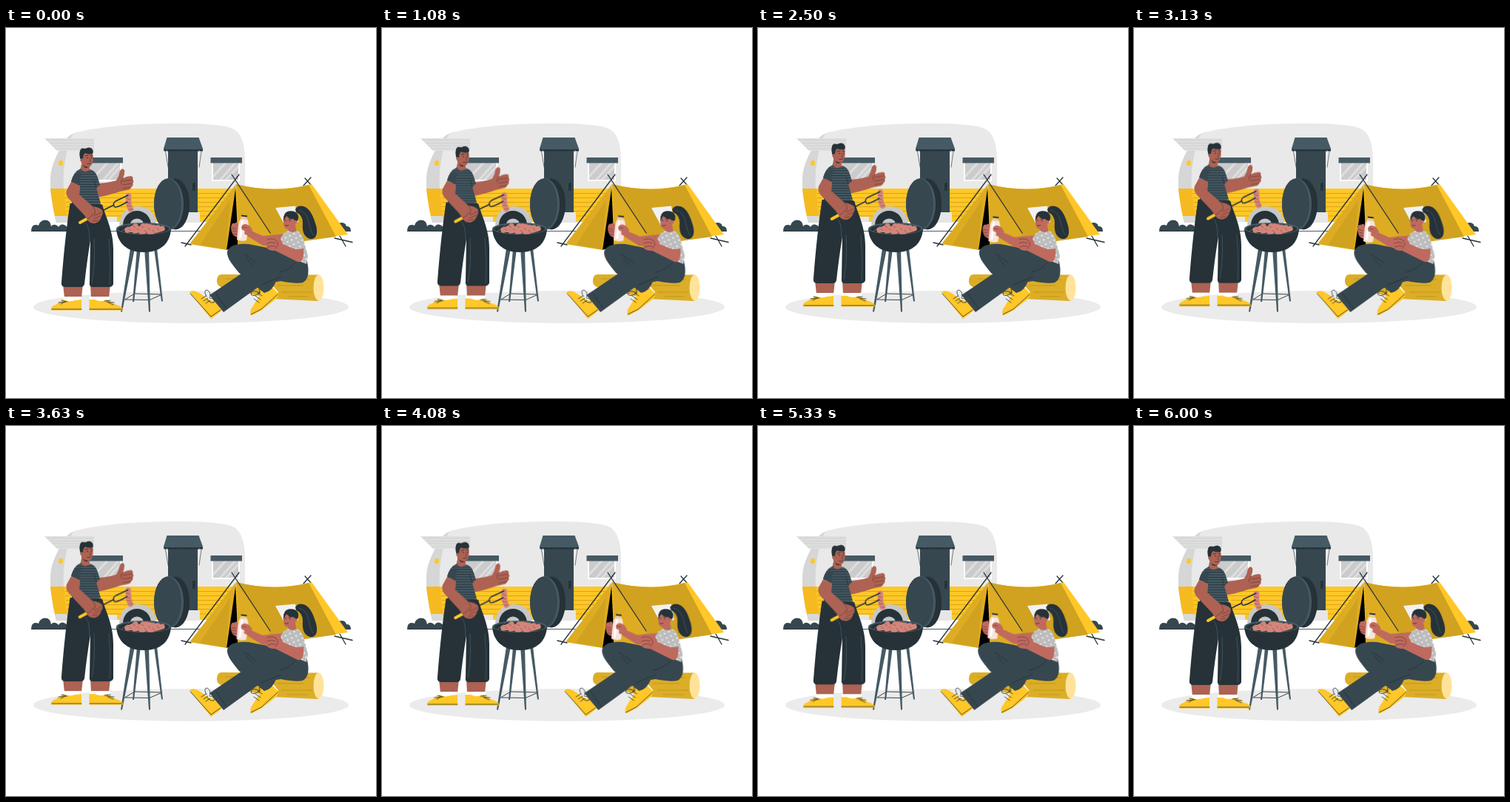
Write an HTML page that moves like this. It is 500x500 px and loops after 6040 ms.

```html
<!DOCTYPE html>
<html lang="en">
<head>
<meta charset="utf-8">
<title>Camping</title>
<style>
html, body { margin: 0; width: 100%; height: 100%; overflow: hidden; background: #fff; }
svg { display: block; width: 100vw; height: 100vh; }
.navy { fill: #263238; }
.slate { fill: #37474f; }
.steel { fill: #455a64; }
.sun { fill: #ffc727; }
.gold { fill: #d1a220; }
.flap { fill: #ddac22; }
.skin { fill: #ad6253; }
#woman .skin { fill: #bf6a5e; }
.ink { fill: none; stroke: #263238; stroke-width: .8; stroke-linecap: round; stroke-linejoin: round; }
.pole { fill: none; stroke: #263238; stroke-width: 1.3; stroke-linecap: round; }
.fold { fill: none; stroke: #6d3a33; stroke-width: .7; stroke-linecap: round; }
.link { fill: none; stroke: #d3857a; stroke-width: 7.5; stroke-linecap: round; }
.char { fill: none; stroke: #9d5348; stroke-width: .8; }
</style>
</head>
<body>
<svg viewBox="0 0 500 500">
  <defs>
    <pattern id="stripes" width="8" height="3.4" patternUnits="userSpaceOnUse">
      <rect width="8" height="3.4" fill="#455a64"/><rect width="8" height="1" fill="#263238"/>
    </pattern>
    <pattern id="dots" width="9" height="9" patternUnits="userSpaceOnUse" patternTransform="rotate(20)">
      <rect width="9" height="9" fill="#bdbdbd"/><circle cx="2" cy="2" r="1.1" fill="#fff"/><circle cx="6.500" cy="6.500" r="1.1" fill="#fff"/>
    </pattern>
    <clipPath id="glassL"><path d="M113 182h41v23h-41z"/></clipPath>
    <clipPath id="glassR"><path d="M280 182h34v23h-34z"/></clipPath>
  </defs>
  <rect width="500" height="500" fill="#fff"/>
  <ellipse cx="250" cy="377" rx="213" ry="22" fill="#ebebeb"/>

  <g id="bushes">
    <path class="slate" d="M34 275Q34 266 40 266Q43 266 44 267Q46 259.500 53 259.500Q60 259.500 61 268Q63 265 67 266Q70 267 71 269Q73 265 77 265.500Q84 267 85 275z"/>
    <path class="slate" d="M446 275Q446 263 453 263Q459 263 460 268Q466 267 466 275z"/>
    <path class="ink" d="M35 274.500H465"/>
  </g>

  <g id="caravan">
    <path fill="#d6d6d6" d="M98 141Q84 142 77 157Q60 184 60 204V220L68 262H110V141z"/>
    <path fill="#e9e9e9" d="M92 142C130 132 184 129 230 129C264 129 289 130 304 135C320 141 323 160 323 184V262H84C78 240 76 205 79 185C82 166 85 150 92 142z"/>
    <path fill="#f5ba20" d="M60 217H323V262H68Q63 246 60 217z"/>
    <path class="sun" d="M79 217H323V262H84Q79 240 79 217z"/>
    <path d="M80 223.500H316M80 229.500H316M81 235.500H316M81 241.500H316M82 247.500H316M83 254H316" stroke="#cf9d16" stroke-width=".8"/>
    <path fill="#d9d9d9" d="M66 254H82L84 263H68z"/>
    <path fill="#e6e6e6" d="M84 255H150V262H84zM219 249H262V263H219z"/>
    <ellipse class="sun" cx="74" cy="182.500" rx="3" ry="3.800"/>
    <path fill="#dedede" d="M52 149H119V166H69z"/>
    <path d="M55 151.500H119M59 155.500H119M62 159H119M66 163H119" stroke="#cacaca" stroke-width=".7"/>

    <path fill="#fff" d="M111 182H156V207H111z"/>
    <path fill="#cbcbcb" d="M113 182H154V205H113z"/>
    <path clip-path="url(#glassL)" d="M115 206L139 180M129 208L154 180M136 208L161 180" stroke="#dedede" stroke-width="3"/>
    <path class="steel" d="M102 175H158V182.500H102z"/>
    <path fill="#fff" d="M278 182H316V207H278z"/>
    <path fill="#cbcbcb" d="M280 182H314V205H280z"/>
    <path clip-path="url(#glassR)" d="M275 206L299 180M287 208L312 180M295 208L320 180" stroke="#dedede" stroke-width="3"/>
    <path class="steel" d="M276.500 175H319V182.500H276.500z"/>

    <path class="slate" d="M219 165H259V249H219z"/>
    <rect class="navy" x="252" y="209" width="4" height="11" rx="1.500"/>
    <path class="ink" d="M215.500 167L219 188M264 167L261 188" style="stroke-width:.6"/>
    <path class="steel" d="M217.500 148H260.500L266 163V165H213V163z"/>
    <path d="M213.500 165.300H266" fill="none" stroke="#263238" stroke-width="2.600" stroke-dasharray="4 .4"/>

    <path fill="#c7c7c7" d="M153 266Q155 241 178 241Q201 241 203 266z"/>
    <circle class="navy" cx="177" cy="266" r="19"/>
    <circle cx="177" cy="267" r="9.500" fill="#c7c7c7"/>
  </g>

  <g id="tent">
    <path class="pole" d="M402 213L412 202M404 203L412 212M237 290L250 293M444 284L468 289.500M451 281L459 295"/>
    <path class="sun" d="M311 211Q362 224 413 211L462 279L353 295z"/>
    <path class="gold" d="M311 211Q362 224 409 212L446 282L353 295z"/>
    <path fill="#f1f1f1" d="M364 243L391 240.500L395 262L377 267z"/>
    <path fill="#000" d="M310 213L297 300L314 296z"/>
    <path class="flap" d="M311 211L248 292L298 300z"/>
    <path class="gold" d="M303 232L262 293L297 299z"/>
    <path class="flap" d="M311 211Q313 240 313 296L354 300L357 276z"/>
    <path class="pole" d="M242 295L315 198M305 198L357 277"/>
  </g>

  <g id="log">
    <path fill="#dcae27" d="M291 333L422 333.500V369L360 366L290 350Q284 347 285 340Q286 333 291 333z"/>
    <path d="M360 340H410M366 348H402M372 357H414M380 363H408M296 339H310" stroke="#b58b18" stroke-width=".7"/>
    <ellipse cx="422.500" cy="351" rx="7" ry="17.500" fill="#ffe39b"/>
  </g>

  <g id="woman">
    <path class="navy" d="M391 245Q394 239 402 241C412 244 416 257 419 267C422 278 419 286 411 285C402 283 400 273 401 264Q401 252 392 249z"/>
    <path class="ink" d="M396 246Q406 248 409 262T415 280" style="stroke:#455a64"/>

    <path fill="#fff" d="M345 351L355 342L368 357L360 362z"/>
    <path class="sun" d="M346 352Q350 354 356 346L368 359Q368 363 365 366L346 381L332 388.500Q329 386 331 380L343 361z"/>
    <path class="ink" d="M331 387L345 380L367 360M335 366l7 5M337 362l7 5M340 358l6 4M343 358q-12-6-12 2q4 4 12-2q-2-8 2-4"/>
    <path class="slate" d="M388 304L328 292Q303 290 299 302C298 311 306 320 315 331L349 358Q360 356 365 342L348 324z"/>
    <path class="ink" d="M322 306Q332 312 347 324M325 311L341 329"/>

    <path fill="#fff" d="M273 364L281 358L297 379L288 386z"/>
    <path class="sun" d="M248 357Q253 353 261 358L273 366Q279 370 281 367L292 382L277 393z"/>
    <path class="ink" d="M249 359L277 390L290 381M264 366l6-4M267 369l6-4M270 372l6-4M271 363q-5-9 1-9q6 4 3 11q9 2 6 6q-6 1-9-4"/>
    <path class="slate" d="M386 300Q402 306 407 316C410 329 409 340 401 344Q392 346 371 342L345 347L294 384L275 361L352 309Q368 299 386 300z"/>
    <path class="ink" d="M283 358L298 379M369 330Q385 326 391 317M372 336Q360 341 345 347"/>

    <g id="reach">
      <path class="skin" d="M379 278L347 281L329 273L326 281L347 294L372 294z"/>
      <path class="skin" d="M304 269Q305 263 309 264Q314 260 314 268L318 277L313 283Q304 281 304 269z"/>
      <path fill="#f8e3dd" d="M317 258Q314 262 314 267L312 286Q317 289 325 287L328 267Q328 262 326 258z"/>
      <path fill="#fff" d="M318 260h3l-3 24h-3z"/>
      <path fill="#e8c987" d="M318 253L326 254L326 259L317 258z"/>
      <path class="navy" d="M318 252.500L326 253.500V255.500L318 254.500z"/>
      <path class="skin" d="M318 270Q318 265 324 265Q330 266 333 273L331 280Q325 281 322 278Q324 273 319 273z"/>
      <path class="fold" d="M305 270l6 2M305 274l6 1M307 278l5 1M320 269l5 1"/>
    </g>

    <path class="skin" d="M381 268L390 261L393 278Q387 281 381 276z"/>
    <path fill="url(#dots)" d="M376 277L382 274Q387 278 393 274Q400 277 402 285L408 308L406 319Q392 315 383 302Q372 290 371 284z"/>
    <path class="skin" d="M387 294L402 296Q403 309 400 314Q398 318 392 315L364 301Q353 301 352 296Q350 291 352 285Q354 280 360 282L367 285L370 290L388 298z"/>
    <path class="fold" d="M353 286Q360 283 365 287M353 291Q359 288 364 291M354 296Q360 293 364 295M365 287Q371 292 364 298"/>
    <path fill="url(#dots)" d="M393 276Q401 278 402 287L404 297Q395 301 386 297z"/>

    <path class="skin" d="M376 254Q374 264 376 269Q379 273 384 271Q391 269 392 261L389 252z"/>
    <path class="navy" d="M375 262Q374 249 382 247.500Q393 246 395 254Q396 260 391 264L389 258Q383 259 379 254Q376 258 375 262z"/>
    <circle class="skin" cx="391" cy="262" r="2.200"/>
    <circle class="navy" cx="378" cy="260" r=".8"/><circle class="navy" cx="383.500" cy="260.500" r=".8"/>
    <path class="ink" d="M377.500 266.500q2 2 4 0M382 258l3 .5"/>
  </g>

  <g id="grill">
    <ellipse class="navy" cx="229" cy="238" rx="19" ry="34.500"/>
    <ellipse class="steel" cx="220" cy="238" rx="20" ry="35"/>
    <ellipse class="slate" cx="218.500" cy="238" rx="18.500" ry="34.500"/>
    <path class="pole" d="M161 367L194 367.500L211 360L174 359z" style="stroke-width:.9"/>
    <path class="steel" d="M177 298h5L173 370h-2zM200 298h4L212 369.500h-2z"/>
    <path class="steel" d="M168 298h6L157 383.500h-2zM187 298h6L195 383.500h-2z"/>
    <path class="navy" d="M149 271H223C222 290 210 303 186 303C163 303 150 290 149 271z"/>
    <ellipse class="steel" cx="186" cy="271" rx="37" ry="8"/>
    <ellipse class="navy" cx="186" cy="271.500" rx="34.500" ry="6.500"/>
    <path d="M156 275l11-9M163 277l14-12M171 278l14-13M179 278l14-13M187 278l14-13M196 278l12-12M205 276l9-9" stroke="#607d8b" stroke-width=".8"/>
    <path class="link" d="M164 273Q171 272 175 268M174 274Q181 273 185 268M183 275Q190 275 194 270M194 275Q202 275 205 270M189 268L200 270M204 273L211 271"/>
    <path class="char" d="M166 271l3 3M171 267l4 3M177 271l3 3M182 267l4 3M187 273l3 4M192 270l3 3M198 273l3 4M204 270l3 4"/>
  </g>

  <g id="man">
    <g id="legs">
      <path class="skin" d="M77 346H104L102 365H79zM114 346H141L139 365H115z"/>
      <path fill="#fff" d="M78 363H102V370H78zM113 363H140V370H113z"/>
      <path class="sun" d="M102 367V381.500H61Q60 376 67 374L78 367Q84 371 93 368zM112.500 367V381.500H158.500Q158 376 149 374L137 367Q128 371 120 367z"/>
      <path class="ink" d="M62 380H102M113 380H157M71 371l10-1M75 368l8 2M74 373l6-3M136 370l10 1M133 369l8-1M138 371l7 3"/>
      <path class="navy" d="M87 234L130 238C134 254 145 273 145 299V346Q144 350 139 350H116Q112 349 113 343L114 287Q109 318 106 346Q105 350 101 350H79Q74 349 75 343C78 303 82 267 87 234z"/>
      <path class="ink" d="M107 263Q113 266 113 288M116 344Q121 322 119 285M140 346Q142 315 139 285" style="stroke:#455a64"/>
      <path class="sun" d="M86 233l3-1v5h-3zM128 235h3v4h-2z"/>
    </g>

    <g id="thumb">
      <path class="skin" d="M120 210Q136 210 149 206Q153 200 154 193Q157 188 160 192Q161 197 158 203Q164 200 169 200Q173 201 171 205Q174 207 171 210Q173 213 169 215Q169 218 164 219L154 221Q140 226 121 229z"/>
      <path class="fold" d="M171 205L158 207M171 210L158 212M169 215L158 217M158 203Q154 207 156 211"/>
    </g>
    <path class="skin" d="M102 184L113 185L113 196Q106 200 100 193z"/>
    <path fill="url(#stripes)" d="M101 190Q107 198 114 191Q121 193 124 202L127 212L122 216L128 237Q116 242 98 238L97 213L88 208Q91 194 101 190z"/>
    <path class="ink" d="M97 213Q97 204 101 199M122 216L119 206"/>

    <g id="head">
      <path class="skin" d="M101 171Q101 185 104 187Q110 191 115 186Q119 180 117 169L105 167z"/>
      <path class="navy" d="M102 180Q98 174 100 166Q101 161 107 163Q113 160 116 163Q119 166 117 170Q111 171 107 169Q104 171 104 177z"/>
      <circle class="skin" cx="102.500" cy="178.500" r="2.300"/>
      <path class="navy" d="M104 185Q108 188.500 112 187.500Q109 190 106 188z"/>
      <circle class="navy" cx="110" cy="175.500" r=".8"/><circle class="navy" cx="115.500" cy="175.500" r=".8"/>
      <path class="ink" d="M107 173l4-1M114 172l3 .8M110 183.500q3 1 5-1"/>
      <path class="fold" d="M113 176l1.500 4l-2 .3"/>
    </g>

    <g id="cook">
      <path class="link" d="M165.500 226.500Q165 239 168.500 245"/>
      <path class="char" d="M162 230l6 2M162 235l6 2M163 240l6 1M166 245l6 0"/>
      <path class="pole" d="M108 258L146 239M165 226L148 234Q143 238 147 242Q150 243 164 235" style="stroke-width:1.500"/>
      <path d="M100 263L109 258" stroke="#ffc727" stroke-width="4" stroke-linecap="round"/>
      <path class="skin" d="M88 208L100 213Q100 221 99 225L117 241Q126 242 130 246Q132 250 129 255Q127 262 120 264Q112 264 110 259L105 252L86 232Q80 226 82 219z"/>
      <path class="fold" d="M117 241Q123 247 119 253M129 249L120 254M128 254L119 258M124 260L117 261M110 258Q116 255 118 251"/>
      <path class="slate" d="M88 207L98 211L100 213Q99 204 101 196Q92 194 88 207z"/>
    </g>
  </g>
</svg>
<script>
const LOOP = 6040;
const start = performance.now();
const part = id => document.getElementById(id);

// Each step is [offset, transform].
function move(id, duration, steps, easing = 'cubic-bezier(.37,0,.63,1)') {
  const frames = steps.map(([offset, transform]) => ({ offset, transform, easing }));
  part(id).animate(frames, { duration, iterations: Infinity }).startTime = start;
}

function swing(id, duration, to, origin) {
  if (origin) part(id).style.transformOrigin = origin;
  const rest = to.replace(/-?[\d.]+/g, '0');
  move(id, duration, [[0, rest], [.5, to], [1, rest]]);
}

const shift = x => `translate(${x}px, 0px)`;

swing('man', LOOP, 'translate(0px, -5.4px)');
swing('head', LOOP, 'translate(0px, -1.1px)');
swing('cook', LOOP / 2, 'rotate(0.9deg)', '92px 205px');
swing('thumb', LOOP / 2, 'rotate(-1.5deg)', '120px 215px');
swing('reach', LOOP, 'translate(-0.6px, 2px)');
move('woman', LOOP / 5, [
  [0, shift(0)], [.42, shift(-1.7)], [.58, shift(-1.6)], [.84, shift(1.6)], [1, shift(0)]
], 'ease-in-out');
</script>
</body>
</html>
```
